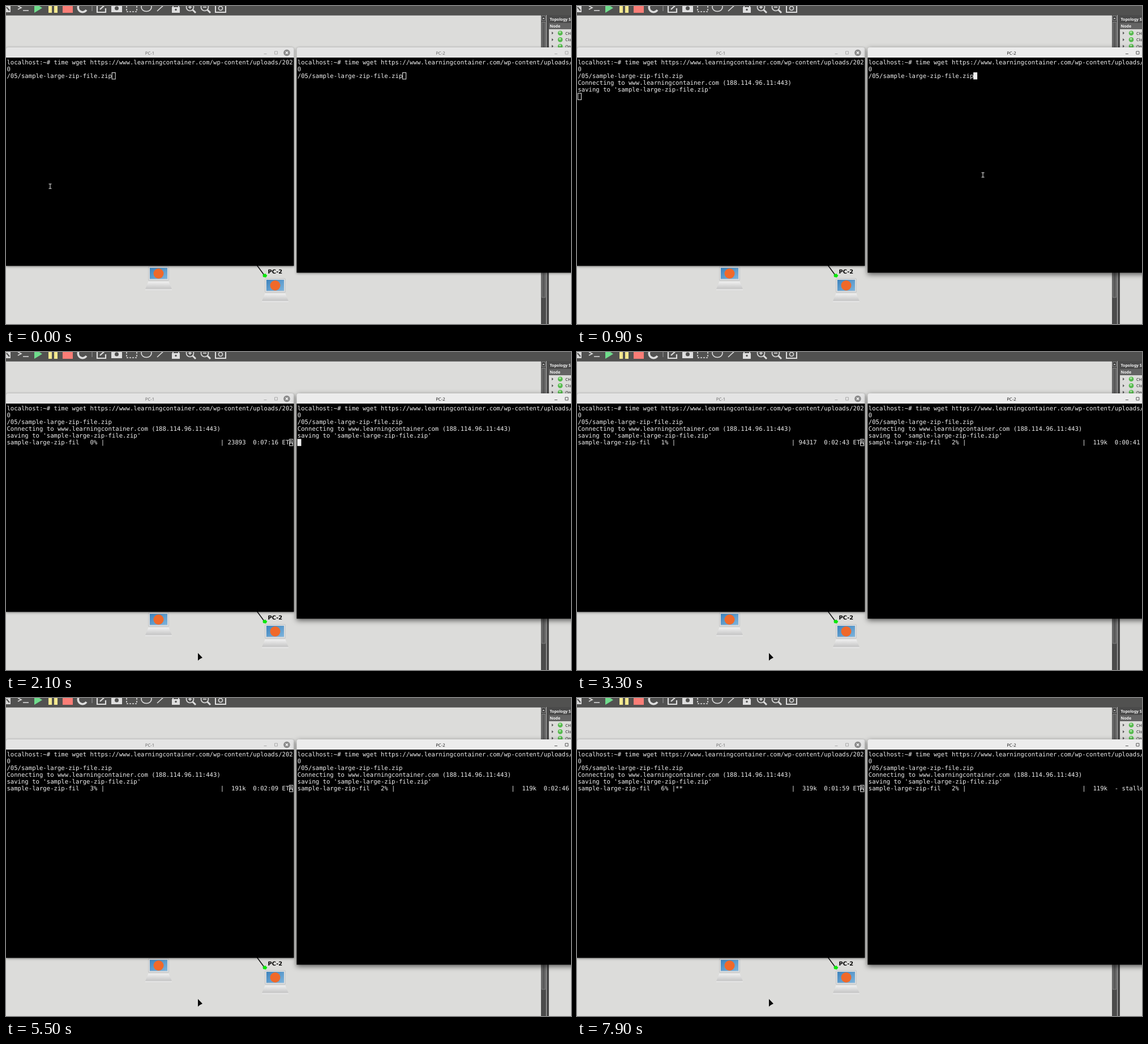
Animation of 998 by 561 pixels, one loop 8000 ms. Source, as an HTML page:

```html
<!DOCTYPE html>
<html lang="en">
<head>
<meta charset="utf-8">
<title>Two terminals downloading</title>
<style>
  html, body { margin: 0; width: 100%; height: 100%; overflow: hidden; background: #dcdcda; }
  svg { display: block; width: 998px; height: 561px; }
  text { text-rendering: geometricPrecision; white-space: pre; }
  .term text { font: 10.63px "DejaVu Sans Mono", monospace; fill: #f0f0f0; }
  .title { font: 7.7px "Noto Sans", sans-serif; text-anchor: middle; fill: #6a6a6a; }
  .side text { font: 7px "Noto Sans", sans-serif; fill: #222; }
  .side .head { font-weight: bold; fill: #f4f4f4; }
  .win { filter: drop-shadow(0 1px 2px rgba(0, 0, 0, .45)); }
  .bar { fill: #e4e4e4; }
  .marks { fill: none; stroke: #aaa; }
  .active .win { filter: drop-shadow(0 3px 5px rgba(0, 0, 0, .6)); }
  .active .bar { fill: #ececec; }
  .active .title { fill: #222; }
  .active .marks { stroke: #555; }
  .cursor { fill: none; stroke: #f0f0f0; }
  .active .cursor { fill: #f0f0f0; }
  .line { fill: none; stroke: #dedede; stroke-width: 1.6; }
</style>
</head>
<body>
<svg viewBox="0 0 998 561">
  <defs>
    <linearGradient id="screen" x2="1" y2="1">
      <stop stop-color="#3d83bd"/><stop offset="1" stop-color="#7db4dc"/>
    </linearGradient>
    <linearGradient id="base" x2="0" y2="1">
      <stop stop-color="#f0f0f0"/><stop offset="1" stop-color="#c4c4c4"/>
    </linearGradient>
    <g id="pc">
      <rect x="-18" y="-12.500" width="36" height="25" rx="1.500" fill="#d9dadb" stroke="#c2c4c6" stroke-width=".8"/>
      <rect x="-15.500" y="-10" width="31" height="19.500" fill="url(#screen)"/>
      <circle r="9" fill="#f0692a"/>
      <path d="M-18 14H18L23.500 27.500H-23.500Z" fill="url(#base)"/>
      <path d="M-23.500 27.500H23.500V29.500H-23.500Z" fill="#e6e6e6"/>
    </g>
  </defs>

  <rect width="998" height="561" fill="#dcdcda"/>

  <!-- toolbar -->
  <rect width="998" height="16.700" fill="#515150"/>
  <path d="M0 0H8V11H0Z" fill="#d9d9d9"/>
  <path d="M1 2L6 8" stroke="#515150" stroke-width="2"/>
  <g class="line">
    <path d="M21 0L27 3L21 6M30 8H40"/>
    <path d="M142 7A8 8 0 1 1 141 -3" stroke-width="3.500"/>
    <path d="M170 -2H161V11H176V4M166 6L177 -4" stroke-width="2.200"/>
    <path d="M213 0V10H231V0" stroke-dasharray="3 2"/>
    <ellipse cx="248" cy="2" rx="9" ry="7.500"/>
    <path d="M267 9L279 -2"/>
    <path d="M295 3V-2M305 3V-2" stroke-width="2"/>
    <path d="M370 -2V11H388V-2" stroke-width="2"/>
    <circle cx="379" cy="4" r="3.500"/>
    <g id="lens"><circle cx="325" cy="2" r="6.500"/><path d="M329.500 6.500L335 12" stroke-width="3"/><path d="M322 2H328"/></g>
    <use href="#lens" x="26"/>
    <path d="M325 -1V5"/>
  </g>
  <path d="M50 -6L64 3.500L50 12Z" fill="#6fdc8c"/>
  <path d="M75 0H81V12H75ZM85 0H91V12H85Z" fill="#f3e88e"/>
  <path d="M100 0H118V12H100Z" fill="#fb7d76"/>
  <path d="M152 0V9" stroke="#777" stroke-width="2"/>
  <path d="M186 0H205V11H186Z" fill="#dedede"/>
  <circle cx="195.500" cy="4" r="3.500" fill="#515150"/>
  <path d="M293 2H307V12H293Z" fill="#dedede"/>
  <circle cx="300" cy="6.500" r="1.700" fill="#515150"/>

  <!-- scroll bar and side panel -->
  <rect x="945" y="16" width="9" height="545" fill="#4b4b4b"/>
  <rect x="946.500" y="17.500" width="6" height="8" fill="#393939" stroke="#858585"/>
  <path d="M948 23L949.500 20L951 23Z" fill="#ddd"/>
  <rect x="946.500" y="28.500" width="6" height="485.500" fill="#5c5c5c" stroke="#838383"/>
  <rect x="954" y="16" width="5" height="545" fill="#494949"/>
  <path d="M954.500 16V561" stroke="#bbb"/>
  <g class="side">
    <rect x="958" y="16" width="40" height="14" fill="#4a4a4a"/>
    <rect x="959" y="30" width="39" height="11" fill="#646464"/>
    <text class="head" x="960.500" y="25.500">Topology S</text>
    <text class="head" x="960.500" y="38.200">Node</text>
    <g id="nodes"></g>
  </g>

  <!-- network canvas -->
  <path d="M440 453L457 476" stroke="#111" stroke-width="1.500"/>
  <path d="M453.500 474L458 472L461.500 475.500L459 479L454 478Z" fill="#0be80b"/>
  <use href="#pc" x="269.500" y="472"/>
  <use href="#pc" x="475.500" y="493"/>
  <text x="462.500" y="472.300" style="font:bold 9.9px 'DejaVu Sans',sans-serif">PC-2</text>

  <g id="windows"></g>

  <path id="beam" d="M-2.500 -4H2.500M0 -4V4M-2.500 4H2.500" fill="none" stroke="#eee"/>
  <path id="arrow" d="M0 0V13.500L3.200 10.800L8 8.300Z" fill="#0a0a0a"/>
</svg>

<script>
const LOOP = 8000, COL = 6.4, ROW = 12.1;
const $ = id => document.getElementById(id);

function el(parent, tag, attrs = {}, text = '') {
  const node = document.createElementNS('http://www.w3.org/2000/svg', tag);
  for (const key in attrs) node.setAttribute(key, attrs[key]);
  node.textContent = text;
  return parent.appendChild(node);
}

['CH', 'Clo', 'Op'].forEach((name, i) => {
  const y = 47.7 + i * 11.7;
  el($('nodes'), 'path', { d: `M964 ${y - 2.5}l3 2.500l-3 2.500z`, fill: '#555' });
  el($('nodes'), 'circle', { cx: 979, cy: y, r: 4.3, fill: '#55b94d' });
  el($('nodes'), 'circle', { cx: 978.5, cy: y - 1.5, r: 2, fill: '#a4e29c' });
  el($('nodes'), 'text', { x: 988, y: y + 2.8 }, name);
});

const COMMAND = [
  'localhost:~# time wget https://www.learningcontainer.com/wp-content/uploads/202',
  '0',
  '/05/sample-large-zip-file.zip'
];
const CONNECT = 'Connecting to www.learningcontainer.com (188.114.96.11:443)';
const SAVE = "saving to 'sample-large-zip-file.zip'";

const progress = (percent, size, eta, stars = 0) =>
  'sample-large-zip-fil' + `${percent}%`.padStart(5) + ' |' +
  '*'.repeat(stars).padEnd(32) + '| ' + size.padStart(5) + '  ' + eta;

// Each step: start time, output line number, text.
const LEFT = [
  [200, 3, ''],
  [300, 3, CONNECT],
  [500, 4, SAVE],
  [1100, 5, progress(0, '0', '--:--:-- ETA')],
  [1900, 5, progress(0, '23893', '0:07:16 ETA')],
  [3100, 5, progress(1, '94317', '0:02:43 ETA')],
  [3900, 5, progress(2, '143k', '0:02:17 ETA')],
  [4900, 5, progress(3, '191k', '0:02:09 ETA')],
  [6200, 5, progress(4, '239k', '0:02:01 ETA', 1)],
  [7200, 5, progress(5, '279k', '0:02:00 ETA', 1)],
  [7900, 5, progress(6, '319k', '0:01:59 ETA', 2)]
];
const RIGHT = [
  [1100, 3, ''],
  [1300, 3, CONNECT],
  [1600, 4, SAVE],
  ...['0:00:41 ETA', '0:01:23 ETA', '0:02:04 ETA', '0:02:46 ETA', '0:03:27 ETA', '- stalled -']
    .map((eta, i) => [2500 + i * 1000, 5, progress(2, '119k', eta)])
];

function makeWindow(x, bottom, name, steps, focus) {
  const width = 508.5, right = x + width;
  const g = el($('windows'), 'g');
  const frame = el(g, 'g', { class: 'win' });
  el(frame, 'path', {
    class: 'bar', d: `M${x} 92V77q0 -4 4 -4H${right - 4}q4 0 4 4V92z`
  });
  el(frame, 'rect', { x, y: 91, width, height: bottom - 91 });
  el(g, 'text', { class: 'title', x: x + 254, y: 85.8 }, name);
  el(g, 'path', { class: 'marks', d: `M${x + 455.5} 84.500h5M${x + 474.5} 80h5v5h-5z` });
  el(g, 'circle', { cx: x + 496, cy: 82.5, r: 5.8, fill: '#8b8b8b' });
  el(g, 'path', { d: `M${x + 494} 80.500l4 4m0 -4l-4 4`, stroke: '#fff', 'stroke-width': 1.2 });

  const term = el(g, 'g', { class: 'term' });
  const cursor = el(term, 'rect', { class: 'cursor', width: 6, height: 11.4 });
  const rows = [0, 1, 2, 3, 4, 5].map(i =>
    el(term, 'text', { x: x + 1.4, y: 102.5 + i * ROW }));

  return time => {
    const lines = [...COMMAND];
    let col = COMMAND[2].length, row = 2;
    for (const [start, line, text] of steps) {
      if (time < start) break;
      lines[line] = text;
      row = line === 5 ? 5 : text ? line + 1 : line;
      col = line === 5 ? Math.min(text.length, 78) : 0;
    }
    rows.forEach((node, i) => {
      const text = lines[i] || '';
      if (node.textContent !== text) node.textContent = text;
    });
    cursor.setAttribute('x', x + 1.6 + col * COL);
    cursor.setAttribute('y', 93.4 + row * ROW);
    g.classList.toggle('active', time >= focus[0] && time < focus[1]);
  };
}

const windows = [
  makeWindow(0, 458.5, 'PC-1', LEFT, [100, 800]),
  makeWindow(513.4, 470.5, 'PC-2', RIGHT, [800, LOOP])
];

// Pointer stops: time, x, y.
const PATH = [[200, 78, 318], [800, 717, 298], [1000, 717, 298], [1700, 339, 531]];

function pointerAt(time) {
  const next = PATH.findIndex(p => p[0] > time);
  if (next < 1) return PATH[next ? PATH.length - 1 : 0].slice(1);
  const [a, b] = [PATH[next - 1], PATH[next]];
  const u = (time - a[0]) / (b[0] - a[0]);
  const ease = u * u * (3 - 2 * u);
  return [1, 2].map(i => a[i] + (b[i] - a[i]) * ease);
}

function draw() {
  const time = performance.now() % LOOP;
  windows.forEach(update => update(time));
  const [x, y] = pointerAt(time);
  const inTerm = x < 509 ? y < 458 : x > 513 && y < 470;
  for (const [id, on] of [['beam', inTerm], ['arrow', !inTerm]]) {
    $(id).setAttribute('transform', `translate(${x} ${y})`);
    $(id).setAttribute('visibility', on ? 'visible' : 'hidden');
  }
  requestAnimationFrame(draw);
}
draw();
</script>
</body>
</html>
```
